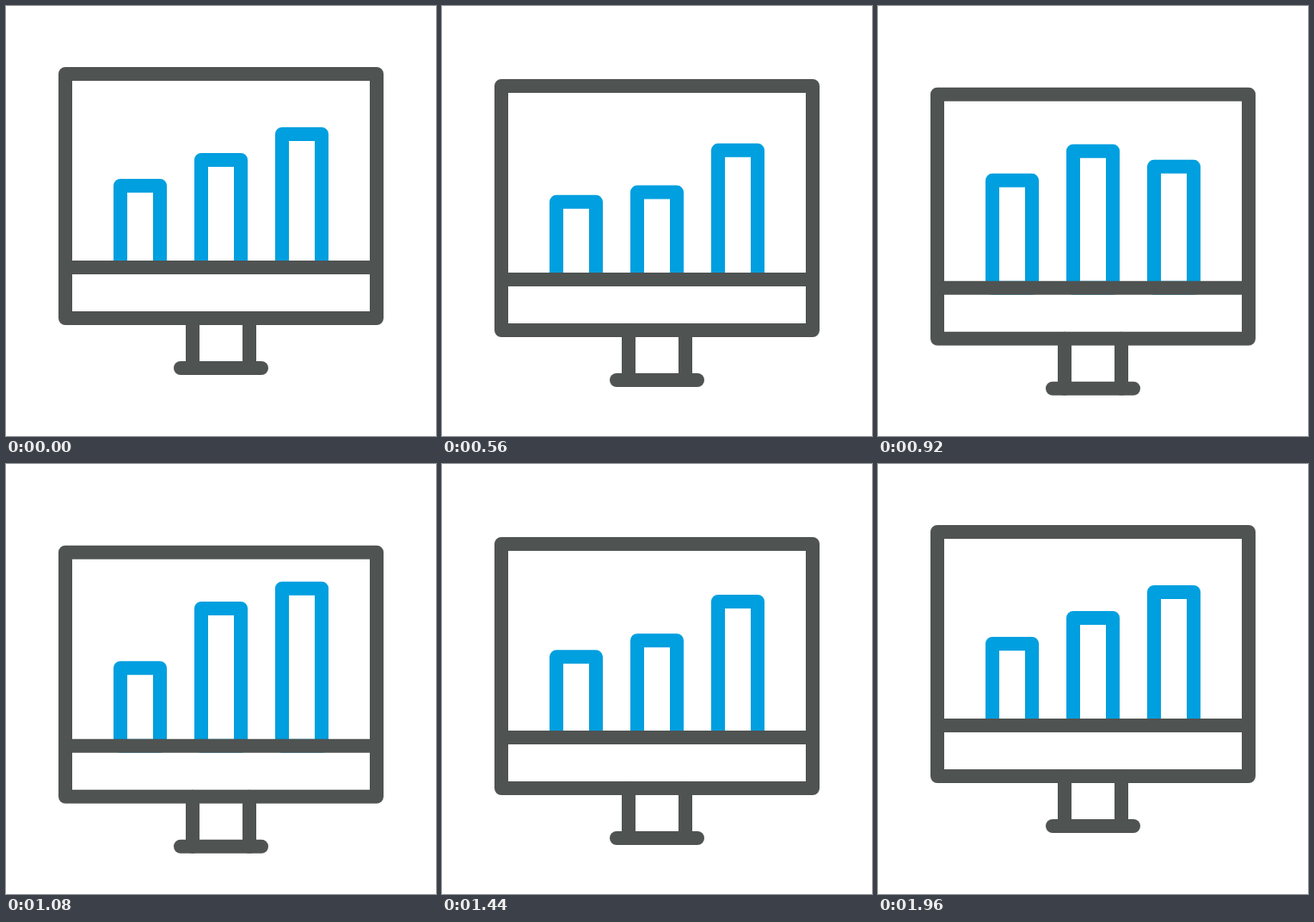
Write an HTML page with a canvas that moves like this. It is 500 px wide and 500 px high and loops after 2000 ms.

```html
<!DOCTYPE html>
<html lang="en">
<head>
<meta charset="utf-8">
<title>Bar chart monitor</title>
<style>
html, body { margin: 0; width: 100%; height: 100%; overflow: hidden; background: #fff; }
canvas { display: block; width: 500px; height: 500px; }
</style>
</head>
<body>
<canvas id="stage" width="500" height="500"></canvas>
<script>
const ctx = document.getElementById('stage').getContext('2d');
const GRAY = '#4f5352', BLUE = '#009fdf';
const LOOP = 2000, STEP = 40, BASE = 304;

// Keys are [time in ms, vertical offset]
const BOB = [[0, 0], [960, 24], [1920, 0]];
const BOUNCE = [[0, 0], [360, 24], [760, -38], [1160, 12.5], [1480, 0]];
const BARS = [
  { x: 133, top: 209, delay: 0 },
  { x: 227, top: 179, delay: 200 },
  { x: 321, top: 149, delay: 400 }
];

// cubic-bezier(.5, 0, .5, 1), solved by bisection
function ease(x) {
  let lo = 0, hi = 1;
  for (let i = 0; i < 24; i++) {
    const s = (lo + hi) / 2;
    if (1.5 * s * (1 - s) + s * s * s < x) lo = s; else hi = s;
  }
  return lo * lo * (3 - 2 * lo);
}

function valueAt(keys, t) {
  if (t <= keys[0][0]) return keys[0][1];
  for (let i = 1; i < keys.length; i++) {
    const [t0, a] = keys[i - 1], [t1, b] = keys[i];
    if (t < t1) return a + (b - a) * ease((t - t0) / (t1 - t0));
  }
  return keys[keys.length - 1][1];
}

function box(x, y, w, h) {
  ctx.beginPath();
  ctx.rect(x, y, w, h);
  ctx.stroke();
}

function line(x0, y0, x1, y1) {
  ctx.beginPath();
  ctx.moveTo(x0, y0);
  ctx.lineTo(x1, y1);
  ctx.stroke();
}

function draw(t) {
  ctx.fillStyle = '#fff';
  ctx.fillRect(0, 0, 500, 500);
  ctx.save();
  ctx.translate(0, valueAt(BOB, t));
  ctx.lineWidth = 16;
  ctx.lineJoin = ctx.lineCap = 'round';

  ctx.strokeStyle = BLUE;
  for (const bar of BARS) {
    const top = bar.top + valueAt(BOUNCE, t - bar.delay);
    box(bar.x, top, 46, BASE - top);
  }

  ctx.strokeStyle = GRAY;
  box(69, 79, 362, 284);
  line(69, BASE, 431, BASE);
  line(217, 363, 217, 421);
  line(283, 363, 283, 421);
  line(203, 421, 297, 421);
  ctx.restore();
}

const start = performance.now();
function tick() {
  const t = (performance.now() - start) % LOOP;
  // The rest pose holds for two steps
  draw(Math.max(0, Math.floor(t / STEP) - 1) * STEP);
  requestAnimationFrame(tick);
}
tick();
</script>
</body>
</html>
```
